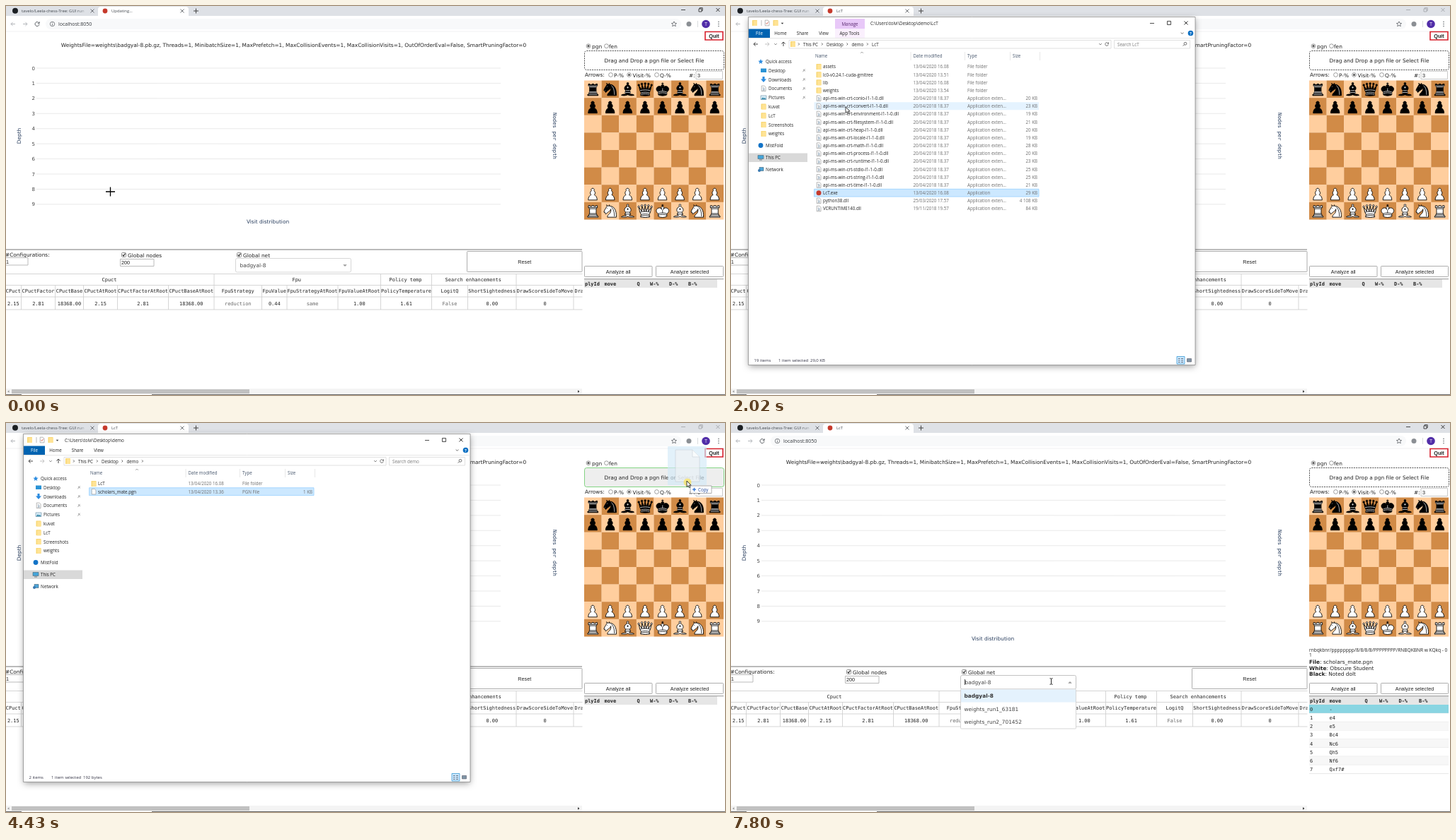
These frames come from a looping animation (1016 by 551 pixels, 8000 ms). An HTML page with a canvas:

```html
<!DOCTYPE html>
<html lang="en">
<head>
<meta charset="utf-8">
<title>Chess tree demo</title>
<style>
html, body { margin: 0; width: 100%; height: 100%; overflow: hidden; background: #fff; }
canvas { display: block; }
</style>
</head>
<body>
<canvas id="stage" width="1016" height="551"></canvas>
<script>
const g = document.getElementById('stage').getContext('2d');
const LOOP = 8000;
const wide = '"DejaVu Sans", sans-serif', sans = '"Open Sans", sans-serif';
const arial = '"Liberation Sans", sans-serif', mono = '"DejaVu Sans Mono", monospace';
const PAGE = `7.4px ${wide}`, BOLD = `bold ${PAGE}`, FEN = `6.6px ${sans}`, TAB = `5.9px ${sans}`;
const URL_FONT = `7px ${sans}`, EXPL = `6.2px ${sans}`, BTN = `7.2px ${arial}`;
const MONO = `6.95px ${mono}`, MONO_B = `bold ${MONO}`;

// ---------- drawing helpers ----------
function text(s, x, y, font = PAGE, color = '#222', align = 'left') {
  g.font = font; g.fillStyle = color; g.textAlign = align;
  g.fillText(s, x, y);
}
function box(x, y, w, h, fill, stroke, r = 0, lw = 0.8) {
  g.beginPath(); g.roundRect(x, y, w, h, r);
  if (fill) { g.fillStyle = fill; g.fill(); }
  if (stroke) { g.strokeStyle = stroke; g.lineWidth = lw; g.stroke(); }
}
function dot(x, y, r, fill, stroke, lw = 0.8) {
  g.beginPath(); g.arc(x, y, r, 0, 7);
  if (fill) { g.fillStyle = fill; g.fill(); }
  if (stroke) { g.strokeStyle = stroke; g.lineWidth = lw; g.stroke(); }
}
function path(d, x, y, stroke, fill, lw = 0.9) {
  const p = new Path2D(d);
  g.save(); g.translate(x, y);
  if (fill) { g.fillStyle = fill; g.fill(p); }
  if (stroke) { g.strokeStyle = stroke; g.lineWidth = lw; g.stroke(p); }
  g.restore();
}
function turned(s, x, y, angle, font) {
  g.save(); g.translate(x, y); g.rotate(angle);
  text(s, 0, 0, font, '#2a3f5f', 'center');
  g.restore();
}
const hline = (x1, x2, y, color, lw = 0.8) => path(`M${x1} ${y}H${x2}`, 0, 0, color, null, lw);
const vline = (x, y1, y2, color, lw = 0.8) => path(`M${x} ${y1}V${y2}`, 0, 0, color, null, lw);
const clamp = v => Math.max(0, Math.min(1, v));
const CROSS = 'M-2.5-2.5l5 5m0-5l-5 5', RIGHT = 'M-1-1.6l1.6 1.6-1.6 1.6', DOWN = 'M-1.8-.9l1.8 1.8 1.8-1.8';
const ARROW_L = 'M3 0H-3m2.6-2.6L-3 0l2.6 2.6', ARROW_R = 'M-3 0H3M.4-2.6L3 0 .4 2.6';

// ---------- chess board ----------
// [outline, inner lines] on a 45-unit square
const PIECES = {
  p: ['M22 9a4 4 0 0 1 3.2 6.4a6.5 6.5 0 0 1 .9 10.6C29.5 27.5 33.5 31.5 33.5 39.5H10.5C10.5 31.5 14.5 27.5 17.9 26a6.5 6.5 0 0 1 .9-10.6A4 4 0 0 1 22 9z', ''],
  r: ['M9 39h27v-3h-3v-4l-2-2.5V17l3-3V9h-4v2h-5V9h-5v2h-5V9h-4v5l3 3v12.5L12 32v4H9z', 'M12 36h21M12 32h21M14 29.5h17M14 17h17M11 14h23'],
  n: ['M20 10C32 10 39 20 38 39H15C15 30 25 32 24 18C23 24 14 26 11 31C9 31 10 28 10 28L6 26C6 22 12 14 14 10.5L13 7L16 10H18L20 7z', 'M8.5 25.5h1M15 15l-1 1.5M33 37C33 26 31 17 25 13'],
  b: ['M20 8a2.5 2.5 0 1 1 5 0l-1.5 3C33 15 32 24 27.5 26L30 32 26 34C28 37 35 34 39 38C33 40 27 39 22.5 37C18 39 12 40 6 38C10 34 17 37 19 34L15 32 17.5 26C13 24 12 15 21.5 11z', 'M17.5 26h10M15 31h15M22.5 15.5v5M20 18h5'],
  q: ['M9 26L6 13l8 11V10l6 14 2.5-15L25 24l6-14v14l8-11-3 13-3 6 1.5 6.5C28 40 17 40 10.5 38.5L12 32z', 'M9.5 26C18 24 27 24 35.5 26M12 32C18 30 27 30 33 32M11.5 36C18 34 27 34 33.5 36'],
  k: ['M11.5 37V30C-2 21 15 8 20.5 19C17 12 20 11.5 22.5 11.5S28 12 24.5 19C30 8 47 21 33.5 30V37C27 40.5 18 40.5 11.5 37z', 'M11.5 30C18 27 27 27 33.5 30M11.5 34C18 31 27 31 33.5 34M22.5 20v8']
};
function board() {
  const size = 24.62, back = 'rnbqkbnr';
  for (let row = 0; row < 8; row++) for (let col = 0; col < 8; col++) {
    const x = 817 + col * size, y = 105.5 + row * size;
    g.fillStyle = (row + col) % 2 ? '#d18b47' : '#ffce9e';
    g.fillRect(x, y, size + 0.1, size + 0.1);
    if (row > 1 && row < 6) continue;
    const kind = row % 7 ? 'p' : back[col], white = row > 5;
    const [outline, inner] = PIECES[kind], body = white ? '#fff' : '#000';
    g.save(); g.translate(x, y); g.scale(size / 45, size / 45); g.lineJoin = 'round';
    path(outline, 0, 0, '#000', body, 1.6);
    path(inner, 0, 0, white ? '#000' : '#ececec', null, 1.4);
    if (kind === 'k') path('M22.5 11.5V5.5M19.5 8h6', 0, 0, '#000', null, 1.8);
    if (kind === 'q') [[6, 12], [14, 9], [22.5, 8], [31, 9], [39, 12]].forEach(([a, b]) => dot(a, b, 2.2, body, '#000', 1.5));
    g.restore();
  }
}

// ---------- browser ----------
function browser(t) {
  const active = t < 1140 || t >= 4850, busy = t < 970 || (t >= 4930 && t < 6180);
  const ctl = active ? '#222' : '#a0a3a8', icon = '#5f6368';
  box(0, 0, 1016, 14, '#dee1e6');
  box(130, 1, 128, 18, '#fff', null, 4);
  dot(13, 6.8, 4, '#1b1f23');
  text('tavelo/Leela-chess-Tree: GUI run', 22, 9, TAB, '#454a50');
  const fade = g.createLinearGradient(100, 0, 116, 0);
  fade.addColorStop(0, '#dee1e600'); fade.addColorStop(1, '#dee1e6');
  box(100, 1, 17, 12, fade);
  dot(140, 7, 3.4, '#c63a2c');
  text(busy ? 'Updating...' : 'LcT', 149, 9, TAB, '#454a50');
  path(CROSS, 122, 7, icon);
  path(CROSS, 249, 7, icon);
  path('M-3.5 0h7M0-3.5v7', 268.5, 7, '#444', null, 1);
  hline(954, 960, 5.5, ctl);
  path('M-2-1h4v4h-4zM-.8-1v-1.4h4v4h-1.2', 981, 5, ctl, null, 0.8);
  path(CROSS, 1006, 5.5, ctl);

  box(0, 14, 1016, 22, '#fff');
  box(56, 18, 898, 15, '#f8f9fa', null, 7.5);
  path(ARROW_L, 10, 25.5, '#b4b7bb', null, 1);
  path(ARROW_R, 27, 25.5, '#b4b7bb', null, 1);
  path('M2.6-1.5A3 3 0 1 0 3 .5M3.2-3.2v2.4H.8', 44, 25.5, icon, null, 1);
  dot(65.5, 25.5, 3.2, null, icon);
  vline(65.5, 25, 27.5, icon); vline(65.5, 23.3, 24.2, icon);
  text('localhost:8050', 74, 28, URL_FONT, '#33373b');
  path('M0-3.6L1.1-1.2 3.6-1 1.7.7 2.3 3.2 0 1.9-2.3 3.2-1.7.7-3.6-1-1.1-1.2z', 944, 25.5, icon, null, 0.8);
  dot(965, 25.5, 3.5, '#8b8f94');
  vline(977.5, 21, 30, '#d0d3d6');
  dot(989, 25.5, 5.8, '#512da8');
  text('T', 989, 28, `6.5px ${sans}`, '#fff', 'center');
  [-3, 0, 3].forEach(d => dot(1007, 25.5 + d, 0.8, icon));
  hline(0, 1016, 36, '#eceef0');
}

// ---------- page ----------
const COLUMNS = [
  ['CPuct', '2.15', 21.5], ['CPuctFactor', '2.81', 69.5], ['CPuctBase', '18368.00', 109.5], ['CPuctAtRoot', '2.15', 157.5],
  ['CPuctFactorAtRoot', '2.81', 229.5], ['CPuctBaseAtRoot', '18368.00', 294], ['FpuStrategy', 'reduction', 361.5],
  ['FpuValue', '0.44', 397], ['FpuStrategyAtRoot', 'same', 469], ['FpuValueAtRoot', '1.00', 529.5],
  ['PolicyTemperature', '1.61', 601.5], ['LogitQ', 'False', 652.5], ['ShortSightedness', '0.00', 721],
  ['DrawScoreSideToMove', '0', 802], ['DrawScoreOpponent', '', 876]
];
const GROUPS = [['Cpuct', 294], ['Fpu', 529.5], ['Policy temp', 601.5], ['Search enhancements', 721]];
const MOVES = ['-', 'e4', 'e5', 'Bc4', 'Nc6', 'Qh5', 'Nf6', 'Qxf7#'];

function radio(x, y, on) {
  dot(x, y, 2.9, '#fff', '#858585');
  if (on) dot(x, y, 1.6, '#555');
}
function checkbox(x, y) {
  box(x, y, 6, 6, '#fff', '#777', 1);
  path('M1.2 3l1.5 1.6 2.3-3.6', x, y, '#222', null, 1.1);
}
function button(label, x, y, w, h) {
  box(x, y, w, h, '#fff', '#999', 0.8);
  text(label, x + w / 2, y + h / 2 + 2.5, BTN, '#222', 'center');
}
function chart() {
  text('WeightsFile=weights\\badgyal-8.pb.gz, Threads=1, MinibatchSize=1, MaxPrefetch=1, MaxCollisionEvents=1, MaxCollisionVisits=1, OutOfOrderEval=False, SmartPruningFactor=0', 406.5, 58, PAGE, '#222', 'center');
  for (let i = 0; i < 10; i++) {
    const y = 88 + i * 21.43;
    hline(43, 699, y, '#e4e4e4');
    text(i, 41, y + 2.5, `7px ${wide}`, '#444', 'right');
  }
  turned('Depth', 20.5, 184, -Math.PI / 2, PAGE);
  turned('Nodes per depth', 773, 184, Math.PI / 2, `7.3px ${mono}`);
  text('Visit distribution', 370, 308, PAGE, '#2a3f5f', 'center');
}
function settings(t) {
  hline(0, 814, 345, '#777', 1);
  text('#Configurations:', -1, 354.5);
  box(-1, 356.5, 32, 10.5, '#fff', '#aaa');
  text('1', 0, 364.5, BTN);
  checkbox(163.5, 349.5); text('Global nodes', 172, 356);
  box(161.5, 358.5, 47.5, 10, '#fff', '#aaa');
  text('200', 163, 366, BTN);
  checkbox(326.5, 349.5); text('Global net', 335, 356);
  button('Reset', 651.5, 347.5, 162.5, 29);

  g.save(); g.beginPath(); g.rect(0, 378, 814.5, 60); g.clip();
  [379.5, 395.5, 412, 430].forEach(y => hline(0, 815, y, '#ccc'));
  let left = 0;
  for (const [label, right] of GROUPS) {
    text(label, (left + right) / 2 - 1, 390, MONO, '#222', 'center');
    vline(right, 379.5, 395.5, '#ccc');
    left = right;
  }
  left = -1;
  for (const [label, value, right] of COLUMNS) {
    const mid = (left + right) / 2;
    text(label, mid, 406, MONO, '#222', 'center');
    text(value, mid, 423.5, MONO, /[a-z]/.test(value) ? '#666' : '#222', 'center');
    vline(right, 395.5, 430, '#ccc');
    left = right;
  }
  g.restore();

  const focused = t >= 7640, open = t >= 7720;
  box(324.5, 357.5, 163, 19.5, '#fff', focused ? '#b3b3b3' : '#ccc', 2);
  text('badgyal-8', 330.5, 370, PAGE, '#444');
  if (focused) vline(330.5, 363, 371, '#222');
  path(open ? 'M-2.8 1.3h5.6L0-1.5z' : 'M-2.8-1.3h5.6L0 1.5z', 479, 367.5, null, '#999');
  if (open) {
    box(324.5, 377, 163, 56, '#fff', '#ccc', 1);
    box(325, 377.4, 162, 18, '#e4f2fd');
    text('badgyal-8', 329.5, 389, BOLD, '#333');
    text('weights_run1_63181', 329.5, 407.5, PAGE, '#444');
    text('weights_run2_701452', 329.5, 426, PAGE, '#444');
  }
  box(0, 542, 814, 8, '#f4f4f4');
  box(8, 543, 336, 6, '#c1c1c1');
  path('M1.5-1.8v3.6L-1 0z', 3, 546, null, '#999');
  path('M-1-1.8v3.6L1.5 0z', 809, 546, null, '#333');
  hline(0, 22, 550.5, '#555', 0.9);
  hline(206, 1016, 550.5, '#555', 0.9);
}
function sidePanel(t, overZone) {
  box(988, 36.5, 25, 11.5, '#fff', '#d8202c', 0, 1.6);
  text('Quit', 1000.5, 45, `bold 7.3px ${arial}`, '#222', 'center');
  radio(823, 56.7, true); text('pgn', 828, 60);
  radio(848.5, 56.7); text('fen', 852, 60);
  if (!overZone) g.setLineDash([2, 1.3]);
  box(817.5, 63.5, 197, 27, overZone ? '#eeeeee' : '#fff', overZone ? '#6c6' : '#222', 3);
  g.setLineDash([]);
  text('Drag and Drop a pgn file or Select File', 916, 79.7, PAGE, '#222', 'center');
  text('Arrows:', 818, 100);
  radio(854.5, 97.5); text('P-%', 859, 101);
  radio(880.5, 97.5, true); text('Visit-%', 885.5, 101);
  radio(919.5, 97.5); text('Q-%', 924, 101);
  text('#:', 965, 100.5);
  box(975, 92.5, 37.5, 11, '#fff', '#bbb'); text('3', 977, 100.5, BTN);
  board();
  if (t >= 5350) {
    text('rnbqkbnr/pppppppp/8/8/8/8/PPPPPPPP/RNBQKBNR w KQkq - 0', 817, 323.5, FEN);
    text('1', 817, 331, FEN);
  }
  if (t >= 5180) [['File', 'scholars_mate.pgn'], ['White', 'Obscure Student'], ['Black', 'Noted dolt']].forEach(([key, value], i) => {
    const y = 341 + i * 8.7;
    text(key, 817, y, BOLD);
    text(': ' + value, 817 + g.measureText(key).width, y);
  });
  button('Analyze all', 817.5, 368.5, 95.5, 15);
  button('Analyze selected', 918.5, 368.5, 95, 15);
  const filled = t >= 5680;
  box(817, 387, filled ? 197 : 188, 12, '#e6e6e6');
  hline(817, 1014, 386.7, '#777');
  const heads = filled ? [895.5, 916, 943.5, 972] : [891.5, 910, 937, 964];
  ['Q', 'W-%', 'D-%', 'B-%'].forEach((s, i) => text(s, heads[i], 395.5, MONO_B));
  text('plyId', 818, 395.5, MONO_B);
  text('move', 845.5, 395.5, MONO_B);
  if (filled) MOVES.forEach((move, i) => {
    const y = 399 + i * 12.2;
    box(817, y, 197, 12.2, i ? (i % 2 ? '#fff' : '#f7f7f7') : '#89d5e2');
    hline(817, 1014, y + 12.2, '#d5d5d5', 0.6);
    text(i, 818, y + 8.7, MONO); text(move, 845.5, y + 8.7, MONO);
  });
}

// ---------- file window ----------
const dll = (name, size, date = '20/04/2018 18.37') => [name + '.dll', date, 'Application exten...', size + ' KB'];
const crt = (name, size) => dll(`api-ms-win-crt-${name}-l1-1-0`, size);
const folder = (name, time) => [name, '13/04/2020 ' + time, 'File folder', ''];
const LCT = [
  folder('assets', '16.08'), folder('lc0-v0.24.1-cuda-gmltree', '13.51'), folder('lib', '16.08'), folder('weights', '13.54'),
  crt('conio', 20), crt('convert', 23), crt('environment', 19), crt('filesystem', 21), crt('heap', 20), crt('locale', 19),
  crt('math', 28), crt('process', 20), crt('runtime', 23), crt('stdio', 25), crt('string', 25), crt('time', 21),
  ['LcT.exe', '13/04/2020 16.08', 'Application', '29 KB'],
  dll('python38', '4 108', '25/03/2020 17.57'), dll('VCRUNTIME140', 84, '19/11/2018 19.57')
];
const DEMO = [folder('LcT', '16.08'), ['scholars_mate.pgn', '13/04/2020 13.36', 'PGN File', '1 KB']];
const ROW = 11.17, rowY = i => 86 + i * ROW;

const folderIcon = (x, y) => { box(x - 3.5, y - 4, 7, 8, '#f8d775', null, 0.5); box(x - 2, y - 3, 5.5, 7, '#ffe394'); };
function pageIcon(x, y, lines) {
  path('M-2.8-3.8h4l1.8 1.8v5.8h-5.8z', x, y, '#8a8a8a', '#fff', 0.6);
  if (lines) { path('M-1.5-1h2.5M-1.5 2.5h3', x, y, '#789', null, 0.6); dot(x + 0.3, y + 0.8, 1.3, '#a9bccb'); }
}
function sidebar() {
  const item = (s, x, y) => text(s, x, y + 2.4, EXPL);
  box(25, 208.5, 83, 12.5, '#d9d9d9');
  path('M0-3.5L1-1 3.5-.8 1.6.9 2.2 3.4 0 2-2.2 3.4-1.6.9-3.5-.8-1-1z', 42, 78.5, null, '#2b8be0');
  item('Quick access', 49, 78.5);
  ['Desktop', 'Downloads', 'Documents', 'Pictures', 'kuvat', 'LcT', 'Screenshots', 'weights'].forEach((s, i) => {
    const y = 91.3 + i * 12.8;
    item(s, 53, y);
    if (i > 3) folderIcon(46, y);
    else path('M-1.5 2l3-4M-1-1.5l3 2.5', 103, y, '#888', null, 0.8);
    if (i === 0) box(42, y - 2.8, 8, 5.5, '#2a93d5');
    if (i === 1) path('M-1.5-4h3v3.5h2.5L0 4-4-.5h2.5z', 46, y, null, '#2b8be0');
    if (i === 2) pageIcon(46, y, true);
    if (i === 3) { box(42, y - 2.8, 8, 5.6, '#d8ecf7', '#6e8ea4', 0, 0.6); path('M-3.5 2.5l2.5-3 1.5 1.5 1.5-1 1.5 2.5z', 46, y, null, '#3f8fae'); }
  });
  dot(42, 197.5, 3.4, '#1273c7');
  item('MistFold', 49, 197.5);
  box(38, 211.5, 8, 5, '#45a5d9', '#4d6675', 0, 0.6); hline(40, 44, 218, '#4d6675');
  item('This PC', 49, 214.5);
  box(40, 228.5, 6, 5, '#4ca4d8', '#4d6675', 0, 0.6); dot(40, 233, 2, '#3a79b0');
  item('Network', 49, 231.5);
}
function ribbon(inDemo) {
  folderIcon(33.5, 24); vline(43, 20, 28, '#aaa');
  pageIcon(51, 24); path('M-1.5 0l1.2 1.5 2-3', 51, 24, '#c54', null, 0.8);
  folderIcon(63, 24); path('M-1.8-.8h3.6L0 1.2z', 72.5, 24.5, null, '#333');
  if (!inDemo) {
    box(147, 18, 42, 14.5, '#e8c8f8'); box(147, 32.5, 42, 13, '#faf0fd');
    text('Manage', 168, 27.5, EXPL, '#5a2a70', 'center');
    text('App Tools', 167.5, 41, EXPL, '#222', 'center');
  }
  text('C:\\Users\\tolvi\\Desktop\\demo' + (inDemo ? '' : '\\LcT'), inDemo ? 83 : 197, 26.5, EXPL);
  hline(592, 598, 24.5, '#222'); box(616.5, 21.5, 5, 5, null, '#222'); path(CROSS, 643, 24, '#222');
  box(25, 32.5, 30, 12.5, '#0063b1');
  text('File', 40, 41, EXPL, '#fff', 'center');
  [['Home', 70], ['Share', 101], ['View', 131]].forEach(([s, x]) => text(s, x, 41, EXPL, '#222', 'center'));
  path(DOWN, 637.5, 38.5, '#555'); dot(649.5, 38.5, 3.8, '#0a6fc2');
  text('?', 649.5, 40.8, `bold 6px ${sans}`, '#fff', 'center');
  hline(25, 656, 45.7, '#dcdcdc');
}
function addressBar(inDemo, lit) {
  path(ARROW_L, 35, 54, '#333'); path(ARROW_R, 51, 54, '#bbb');
  path(DOWN, 63, 54, '#555', null, 0.7); path('M0 3V-3m-2.6 2.6L0-3l2.6 2.6', 74, 54, '#333');
  box(82, 48.5, 455, 11.5, '#fff', '#d9d9d9');
  box(541.5, 48.5, 107, 11.5, '#fff', '#d9d9d9');
  if (lit) box(168, 49, 21, 10.5, '#d9eefc');
  folderIcon(87.5, 54);
  [['This PC', 102, 96], ['Desktop', 135, 129], ['demo', 170.5, 164.5], ['LcT', 199, 193]].forEach(([s, x, mark], i) => {
    path(RIGHT, mark, 54, '#444', null, 0.8);
    if (i < 3 || !inDemo) text(s, x, 56.5, EXPL);
  });
  path(DOWN, 522, 54, '#555', null, 0.8);
  path('M2-1.2A2.3 2.3 0 1 0 2.3.5M2.5-2.5v1.8H.7', 531, 54, '#555', null, 0.8);
  text('Search ' + (inDemo ? 'demo' : 'LcT'), 546, 56.5, EXPL, '#777');
  dot(642, 53.3, 1.9, null, '#555'); path('M-1.3 1.3l-2 2', 642, 53.3, '#555');
}
function explorer(t, cur) {
  const show = clamp((t - 1140) / 160) * (1 - clamp((t - 4850) / 160));
  if (!show) return;
  const inDemo = t >= 2740, files = inDemo ? DEMO : LCT;
  const picked = inDemo ? +(t >= 3300) : 16, dragging = t >= 3390;
  g.save();
  g.globalAlpha = show;
  if (t < 1300) {
    const k = 0.9 + 0.1 * show;
    g.translate(340, 551); g.scale(k, k); g.translate(-340, -551);
  }
  g.save(); g.shadowColor = 'rgba(0,0,0,.4)'; g.shadowBlur = 9; g.shadowOffsetY = 2;
  box(24.5, 15.5, 631.5, 493, '#fff');
  g.restore();
  box(24.5, 15.5, 631.5, 493, null, '#8c8c8c');
  ribbon(inDemo);
  addressBar(inDemo, t >= 2340 && t < 3100);
  sidebar();

  const headLit = !dragging && t > 1460 && cur.x > 111 && cur.x < 254 && cur.y > 64 && cur.y < 77;
  if (headLit) { box(111, 64.5, 143, 12, '#d9ebf9'); path(DOWN, 249.5, 70.5, '#555', null, 0.7); }
  path('M-1.8.9L0-.9 1.8.9', 185, 66, '#777', null, 0.7);
  [['Name', 119], ['Date modified', 257.5], ['Type', 334], ['Size', 398]].forEach(([s, x]) => text(s, x, 73, EXPL, '#44546a'));
  [254, 330.5, 394.5, 436.5].forEach(x => vline(x, 65, 77, '#e2e2e2'));

  const hover = !dragging && t >= 1460 && cur.x > 117 && cur.x < 435 && cur.y > 80 ? Math.round((cur.y - 86) / ROW) : -1;
  files.forEach(([name, date, kind, size], i) => {
    const y = rowY(i), base = y + 2.4;
    if (i === picked) box(117.5, y - 5.4, 317.5, 10.8, '#cce8ff', '#99d1ff');
    else if (i === hover) box(117.5, y - 5.5, 317.5, 11, '#e5f3ff');
    if (kind === 'File folder') folderIcon(124, y);
    else if (name === 'LcT.exe') dot(124, y, 3.5, '#c63a2c');
    else pageIcon(124, y, !inDemo);
    text(name, 130, base, EXPL);
    text(date, 257.5, base, EXPL, '#6d6d6d');
    text(kind, 334, base, EXPL, '#6d6d6d');
    text(size, 433, base, EXPL, '#6d6d6d', 'right');
  });
  const status = `6px ${sans}`;
  text(inDemo ? '2 items' : '19 items', 32.5, 504, status, '#334');
  text('1 item selected', inDemo ? 64 : 67, 504, status, '#334');
  if (!inDemo || picked) text(inDemo ? '192 bytes' : '29,0 KB', inDemo ? 109 : 112, 504, status, '#334');
  box(630, 496.5, 11, 10.5, '#cce8ff', '#3c9bd6');
  [499.5, 502, 504.5].forEach(y => { hline(632, 634.5, y, '#456'); hline(636, 639, y, '#456'); });
  box(644.5, 499.5, 6, 4.5, '#7f95a6', '#556', 0, 0.6);
  g.restore();
}

// ---------- pointer ----------
// [time, x, y]; eased between neighbours
const TRACK = [
  [0, 147.5, 263], [80, 151, 270], [720, 285, 540], [1460, 270, 500], [2020, 162, 143], [2260, 170, 57], [2580, 178, 51],
  [2740, 178, 51], [2980, 167, 70], [3220, 150, 94], [3390, 150, 94], [4190, 958, 78], [4430, 962, 82],
  [5350, 962, 82], [5430, 942.5, 82], [6350, 942.5, 82], [6510, 897, 90], [6760, 897, 90], [7560, 452.5, 366], [LOOP, 452.5, 366]
];
function pointerAt(t) {
  const i = TRACK.findIndex(k => k[0] > t), [t0, x0, y0] = TRACK[i - 1], [t1, x1, y1] = TRACK[i];
  const p = (t - t0) / (t1 - t0), e = p * p * (3 - 2 * p);
  return { x: x0 + (x1 - x0) * e, y: y0 + (y1 - y0) * e };
}
function pointer(t, { x, y }) {
  if (t < 720) return path('M-6.5 0h13M0-6.5v13', x, y, '#000', null, 1.3);
  if (t < 1460) return;
  if (t >= 3390 && t < 4850) {
    g.save(); g.globalAlpha = 0.65;
    box(x - 27, y - 49, 55, 55, '#d3eaf8', null, 1);
    path('M0 0h24l10 10v35H0z', x - 16, y - 44, '#c4ccd2', '#f1f3f5', 0.8);
    path('M24 0v10h10', x - 16, y - 44, '#c4ccd2', '#fff', 0.8);
    g.restore();
    dot(x + 1, y + 2, 5.5, 'rgba(255,225,60,.6)');
    if (x > 656) {
      box(x + 5, y + 7, 30, 10.5, '#fff', '#9a9a9a');
      path('M-2.5 0h5M0-2.5v5', x + 10.5, y + 12.2, '#2a6fd0', null, 1.3);
      text('Copy', x + 16, y + 14.5, EXPL, '#234a9c');
    }
  }
  if (y > 358 && t > 6760) return path('M-2-4.2h1.5L0-3.7.5-4.2H2M0-3.7v7.4M-2 4.2h1.5L0 3.7.5 4.2H2', x, y, '#111');
  path('M0 0v8.5l2-1.8 1.3 3 1.4-.6-1.3-2.9h2.7z', x, y, '#111', '#fff', 0.8);
}

function draw(t) {
  g.fillStyle = '#fff';
  g.fillRect(0, 0, 1016, 551);
  const cur = pointerAt(t);
  const overZone = t > 3390 && t < 4850 && cur.x > 817 && cur.y > 63;
  browser(t);
  chart();
  settings(t);
  sidePanel(t, overZone);
  explorer(t, cur);
  pointer(t, cur);
}
const start = performance.now();
(function frame() {
  draw((performance.now() - start) % LOOP);
  requestAnimationFrame(frame);
})();
</script>
</body>
</html>
```
